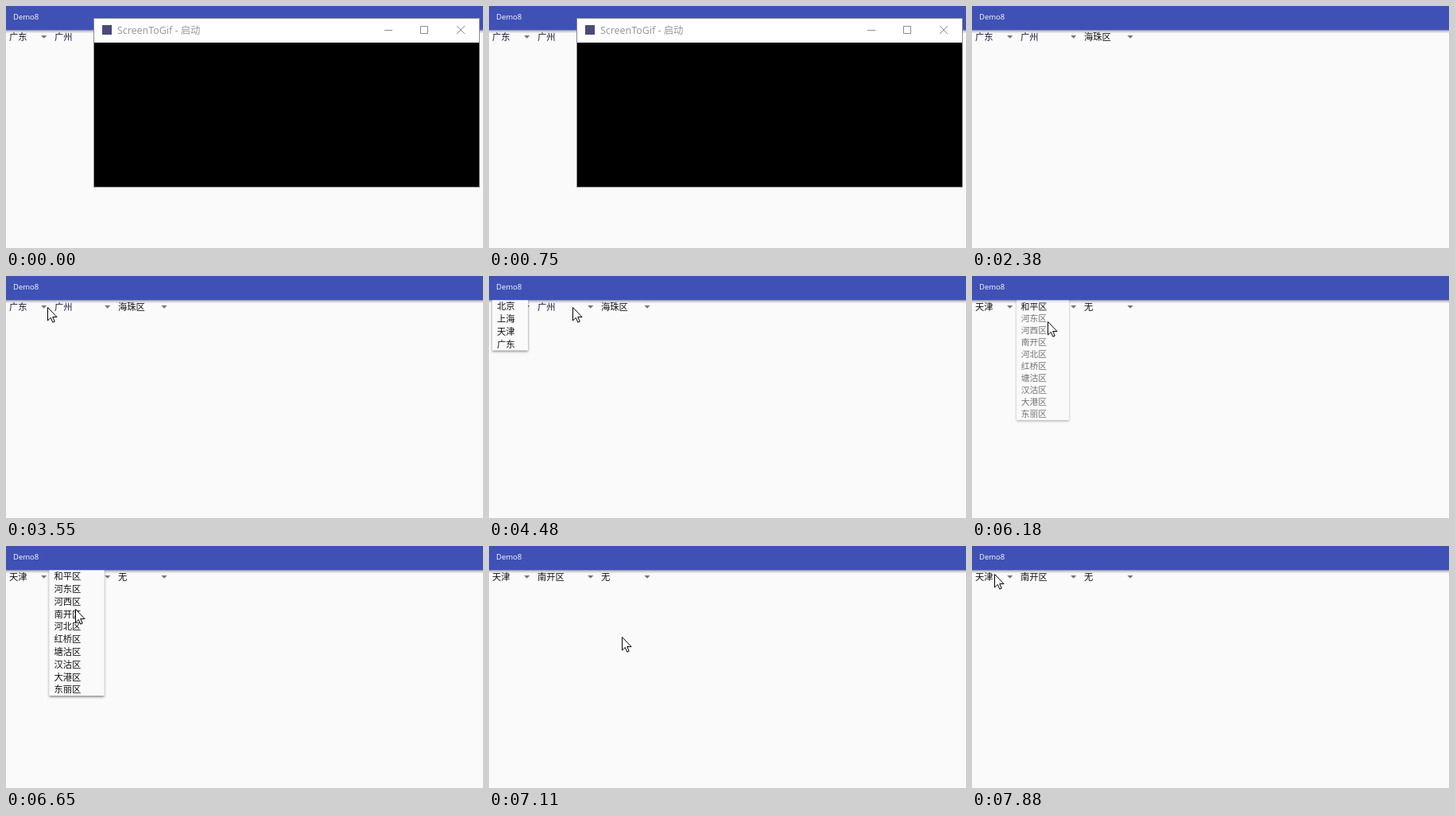
Animation of 600x304 px, one loop 8 s. Source, as an HTML page:

```html
<!DOCTYPE html>
<html lang="zh-CN">
<head>
<meta charset="utf-8">
<style>
  html, body { margin: 0; width: 100%; height: 100%; overflow: hidden; background: #fafafa; }
  svg { display: block; width: 600px; height: 304px; }
  text { font: 11.3px "Noto Sans CJK SC", "Noto Sans CJK", sans-serif; fill: #111; }
  .app { font: 9.5px "Open Sans", "Noto Sans", sans-serif; fill: #fff; }
  .caption { font: 12.4px "Noto Sans", "Noto Sans CJK SC", "Noto Sans CJK", sans-serif; fill: #999; }
</style>
</head>
<body>
<svg viewBox="0 0 600 304">
  <defs>
    <linearGradient id="fade" x2="0" y2="1">
      <stop stop-color="#000" stop-opacity=".32"/>
      <stop offset="1" stop-color="#000" stop-opacity="0"/>
    </linearGradient>
    <filter id="lift" x="-20%" y="-20%" width="140%" height="140%">
      <feDropShadow dx="0" dy="1.5" stdDeviation="1.5" flood-opacity=".5"/>
    </filter>
  </defs>
  <rect width="600" height="304" fill="#fafafa"/>
  <g id="spinners"></g>
  <rect y="30" width="600" height="4.5" fill="url(#fade)"/>
  <g id="popups"></g>
  <rect width="600" height="30.3" fill="#3f51b5"/>
  <text class="app" x="9" y="17">Demo8</text>
  <g id="window">
    <rect x="110.5" y="15.5" width="485" height="212" fill="#fff" stroke="#8a8a8a"/>
    <rect x="111" y="46" width="484" height="181"/>
    <rect x="121" y="24" width="12" height="12" fill="#4a4a78"/>
    <text class="caption" x="140" y="35">ScreenToGif - 启动</text>
    <path d="M476 30.5h10M521.5 25.5h9v9h-9zM567 25l10 10M577 25l-10 10" fill="none" stroke="#8c8c8c"/>
  </g>
  <path id="cursor" d="M.5 .5V17L4.3 13.4L6.8 19.2L9.2 18.1L6.7 12.5H12Z" fill="#fff" stroke="#000"/>
</svg>
<script>
const LOOP = 8000, START = 590, STEP = 77.45;
const ROW = 15.8, TOP = 30;
const NS = 'http://www.w3.org/2000/svg';
const $ = id => document.getElementById(id);

function add(parent, tag, attrs, content = '') {
  const node = document.createElementNS(NS, tag);
  for (const name in attrs) node.setAttribute(name, attrs[name]);
  node.textContent = content;
  parent.append(node);
  return node;
}

// Values are [first step, text, colour].
const NAVY = '#16163c', BLACK = '#111';
const spinners = [
  { x: 4, arrow: 47.7, pressed: [39, 41], values: [[-1, '广东', NAVY], [60, '天津', BLACK]] },
  { x: 61, arrow: 127.7, values: [[-1, '广州', NAVY], [60, '和平区', BLACK], [81, '南开区', BLACK]] },
  { x: 141, arrow: 199, values: [[-1, '海珠区', BLACK], [60, '无', BLACK]] }
];
for (const s of spinners) {
  s.label = add($('spinners'), 'text', { x: s.x, y: 43 });
  s.mark = add($('spinners'), 'path', { d: `M${s.arrow - 3.6} 37h7.2l-3.6 3.7z` });
}

const popups = [
  { x: 4, width: 45, open: 41, close: 60, items: '北京 上海 天津 广东' },
  { x: 54.5, width: 69, open: 71, close: 81,
    items: '和平区 河东区 河西区 南开区 河北区 红桥区 塘沽区 汉沽区 大港区 东丽区' }
];
for (const p of popups) {
  const items = p.items.split(' ');
  p.group = add($('popups'), 'g', {});
  add(p.group, 'rect', { x: p.x, y: TOP, width: p.width, height: items.length * ROW,
    fill: '#fafafa', filter: 'url(#lift)' });
  items.forEach((item, i) =>
    add(p.group, 'text', { x: p.x + 6, y: TOP + 12.1 + i * ROW }, item));
}

// Pointer tip as [step, x, y].
const visits = [
  [[0, 124, 289], [1, 38, 283]],
  [[28, 212, 249], [31, 150, 140], [34, 80, 62], [38, 52, 39],
   [41, 52, 39], [45, 72, 48], [48, 98, 44], [50, 105, 39], [51, 98, 39],
   [54, 50, 58], [56, 28, 66], [60, 28, 66], [64, 62, 58], [69, 100, 43],
   [71, 99, 45], [72, 95, 57], [74, 88, 74], [77, 88, 74], [78, 87, 79],
   [80, 87, 79], [81, 89, 80], [84, 167, 114], [86, 440, 282], [87, 347, 231],
   [88, 347, 231], [91, 160, 120], [93, 45, 48], [94, 28, 35], [96, 28, 35]]
];

function pointerAt(step) {
  for (const keys of visits) {
    if (step < keys[0][0] || step > keys[keys.length - 1][0]) continue;
    const i = Math.max(1, keys.findIndex(k => k[0] >= step));
    const [a, ax, ay] = keys[i - 1], [b, bx, by] = keys[i];
    const u = (step - a) / (b - a);
    return [ax + (bx - ax) * u, ay + (by - ay) * u].map(Math.round);
  }
  return null;
}

function show(node, visible) {
  node.setAttribute('display', visible ? 'inline' : 'none');
}

function drawPopup(p, step) {
  const grow = Math.min(1, (step - p.open + 1) / 4);
  const leave = Math.max(0, (step - p.close + 1) / 3);
  const visible = step >= p.open && leave < 1;
  show(p.group, visible);
  if (!visible) return;
  const scale = 1 - 0.18 * (1 - grow) ** 2;
  const middle = p.x + p.width / 2;
  p.group.setAttribute('opacity', Math.min(1, grow * 1.15) * (1 - leave));
  p.group.setAttribute('transform',
    `translate(${middle} ${TOP}) scale(${scale}) translate(${-middle} ${-TOP})`);
}

function render(time) {
  const step = Math.floor((time % LOOP - START) / STEP);
  for (const s of spinners) {
    const [, text, colour] = s.values.filter(v => v[0] <= Math.max(step, -1)).pop();
    const pressed = s.pressed && step >= s.pressed[0] && step < s.pressed[1];
    if (s.label.textContent !== text) s.label.textContent = text;
    s.label.style.fill = colour;
    s.mark.setAttribute('fill', pressed ? '#ff4081' : '#757575');
  }
  popups.forEach(p => drawPopup(p, step));
  show($('window'), step < 23);
  const tip = pointerAt(step);
  show($('cursor'), tip);
  if (tip) $('cursor').setAttribute('transform', `translate(${tip})`);
}

const begin = performance.now();
function loop() {
  render(performance.now() - begin);
  requestAnimationFrame(loop);
}
loop();
</script>
</body>
</html>
```
